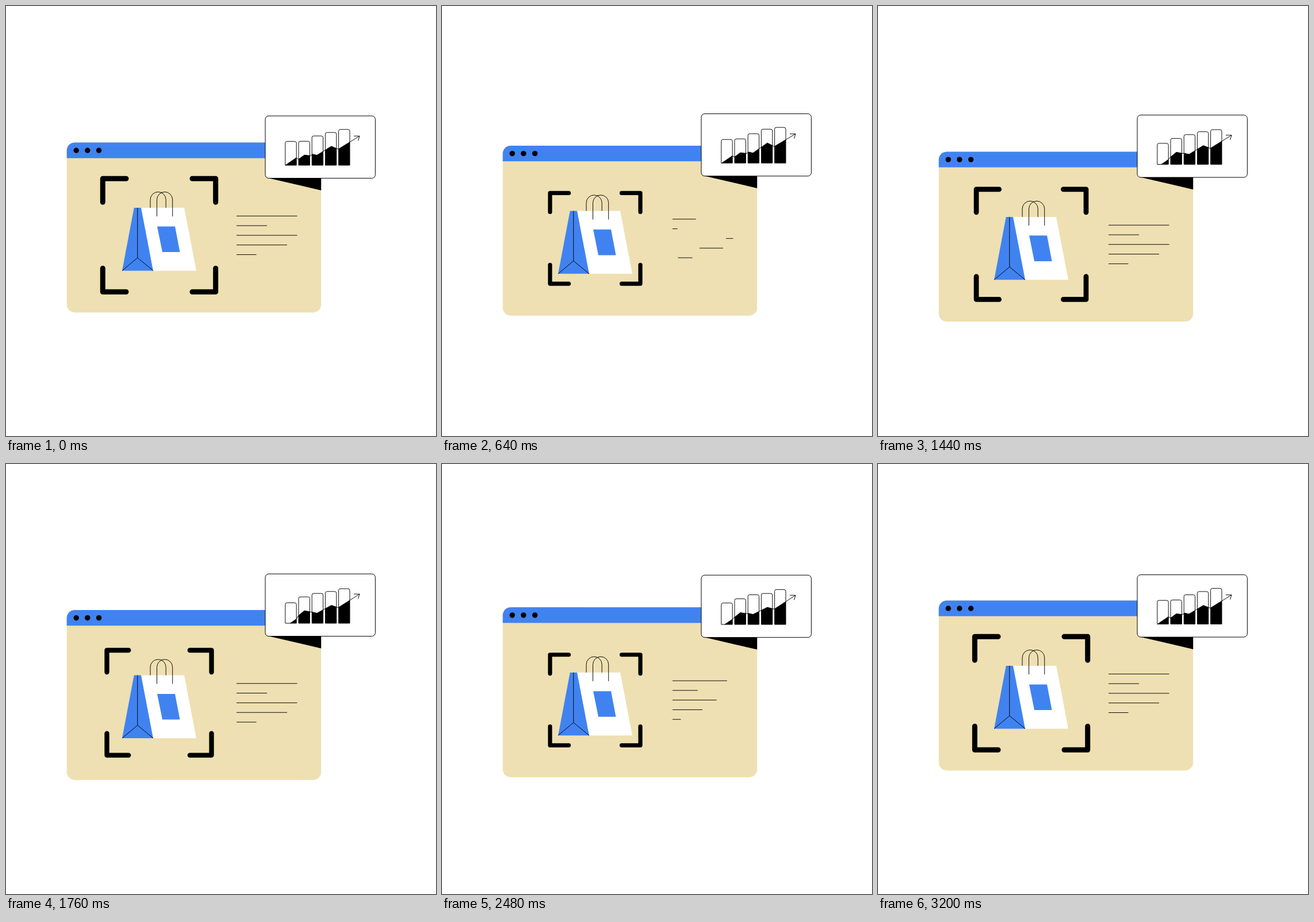
Animation of 748 by 748 pixels, one loop 3.28 s. Source, as an HTML page:

```html
<!DOCTYPE html>
<html lang="en">
<head>
<meta charset="utf-8">
<title>Product scan</title>
<style>
  html, body { margin: 0; width: 100%; height: 100%; overflow: hidden; background: #fff; }
  svg { display: block; width: 100vw; height: 100vh; }
  .thin { fill: none; stroke: #000; stroke-width: 0.95; }
  .blue { fill: #4083f0; }
</style>
</head>
<body>
<svg viewBox="0 0 748 748">
  <defs>
    <clipPath id="frame"><rect x="105.7" y="237.5" width="442.5" height="295.7" rx="14"/></clipPath>
    <clipPath id="barClip"><path id="barMask"/></clipPath>
  </defs>

  <g id="window">
    <g clip-path="url(#frame)">
      <rect x="105" y="237" width="444" height="297" fill="#eee0b2"/>
      <rect class="blue" x="105" y="237" width="444" height="27.7"/>
    </g>
    <circle cx="122.2" cy="251.2" r="4.7"/>
    <circle cx="141.8" cy="251.2" r="4.7"/>
    <circle cx="161.6" cy="251.2" r="4.7"/>

    <path class="blue" d="M222.7 351H235.5L256.3 460.4H202Z"/>
    <path fill="#fff" d="M235 351H310L331 460.4H256Z"/>
    <path class="blue" d="M263 383.4H294L302.5 428H272Z"/>
    <path class="thin" d="M228.8 351V438L202 460.4M228.8 438L256 460.4"/>
    <path class="thin" d="M251 351V337a13.6 13.6 0 0 1 27.2 0V351M262.5 366V337a13.6 13.6 0 0 1 27.2 0V366"/>

    <path id="brackets" fill="none" stroke="#000" stroke-width="9" stroke-linecap="round" stroke-linejoin="round"
      d="M-98.2 -57.5V-98.5H-57.5M57.5 -98.5H98.2V-57.5M98.2 57.5V98.5H57.5M-57.5 98.5H-98.2V57.5"/>
    <path id="text" class="thin"/>
  </g>

  <g id="card">
    <path d="M455 299H548.2V320.7Z"/>
    <rect x="451" y="191.2" width="191.4" height="108.4" rx="6" fill="#fff" stroke="#000"/>
    <g transform="translate(0 277)">
      <path id="area" clip-path="url(#barClip)"/>
      <path id="bars" class="thin"/>
      <path id="trend" class="thin"/>
      <path class="thin" d="M605 -50.8H615L612.6 -42.6"/>
    </g>
  </g>
</svg>
<script>
  const LOOP = 3280, HALF = LOOP / 2, STEP = 80;

  // Chart heights: mean, then the swing of the early and of the late wave.
  const bars = [
    [38.7, 3.2, 0],
    [43.7, -2.2, 0],
    [51.4, -0.5, 0],
    [56.4, 0, 2.6],
    [61.2, 1.2, 0]
  ];
  // Trend vertices: x, then a height as above.
  const trend = [
    [505, 10.3, 3.1, 0],
    [508.7, 11.7, -1.6, 0],
    [519, 19.7, -2.2, 0],
    [530, 18, -1.7, 0],
    [533, 19.3, 0, 0],
    [541, 17.5, 0, 0],
    [566, 32.4, 0, 2.7],
    [578, 27.7, 0, 1.1]
  ];
  const lineEnds = [506.5, 454, 506.5, 489, 435.5];

  const $ = id => document.getElementById(id);
  const clamp = x => Math.min(1, Math.max(0, x));
  const easeInOut = x => (1 - Math.cos(Math.PI * clamp(x))) / 2;
  const wave = (t, peak) => Math.cos(2 * Math.PI * (t - peak) / LOOP);
  const height = ([mean, early, late], t) => mean + early * wave(t, 250) + late * wave(t, 700);
  const setPath = (id, d) => $(id).setAttribute("d", d);
  const move = (id, y) => $(id).setAttribute("transform", `translate(0 ${y})`);

  // Both floats lag at the start of their second half.
  function windowY(t) {
    const u = t / HALF;
    return 16.5 * (u < 1 ? easeInOut(u) : 1 - easeInOut(((u - 1) / 0.95) ** 1.65));
  }

  function cardY(t) {
    const u = t / HALF;
    return 4 * (u < 1 ? -Math.sin(Math.PI * u) : Math.sin(Math.PI * (u - 1) ** 2.6));
  }

  function bracketScale(t) {
    return 1 - 0.2 * (easeInOut(t / 290) - easeInOut((t - 1130) / 410));
  }

  // Each line is wiped away from the left, then written again.
  function textPath(t) {
    return lineEnds.map((end, i) => {
      const left = 401, y = 365.3 + i * 16.8, local = t - i * 48;
      const erased = clamp((local - 328) / 230) ** 2;
      const written = 1 - (1 - clamp((local - 562) / 520)) ** 3;
      const at = p => left + (end - left) * p;
      if (written > 0) return `M${left} ${y}H${at(written)}`;
      return erased < 1 ? `M${at(erased)} ${y}H${end}` : "";
    }).join("");
  }

  function barsPath(t) {
    return bars.map((bar, i) => {
      const x = 485.8 + i * 23.2;
      return `M${x} 0V${3 - height(bar, t)}q0 -3 3 -3h13.4q3 0 3 3V0Z`;
    }).join("");
  }

  function trendPath(t) {
    const points = trend.map(([x, ...h]) => `L${x} ${-height(h, t)}`).join("");
    return `M${490 - 4.5 * wave(t, 250)} 0${points}L615 -50.8`;
  }

  function draw(t) {
    const cycle = t % HALF;
    move("window", windowY(t));
    move("card", cardY(t));
    $("brackets").setAttribute("transform", `translate(266.5 398.8) scale(${bracketScale(cycle)})`);
    setPath("text", textPath(cycle));

    setPath("bars", barsPath(t));
    setPath("barMask", barsPath(t));
    setPath("trend", trendPath(t));
    setPath("area", trendPath(t) + "V0Z");
  }

  function tick() {
    const t = performance.now() % LOOP;
    draw(Math.floor(t / STEP) * STEP);
    requestAnimationFrame(tick);
  }
  tick();
</script>
</body>
</html>
```
